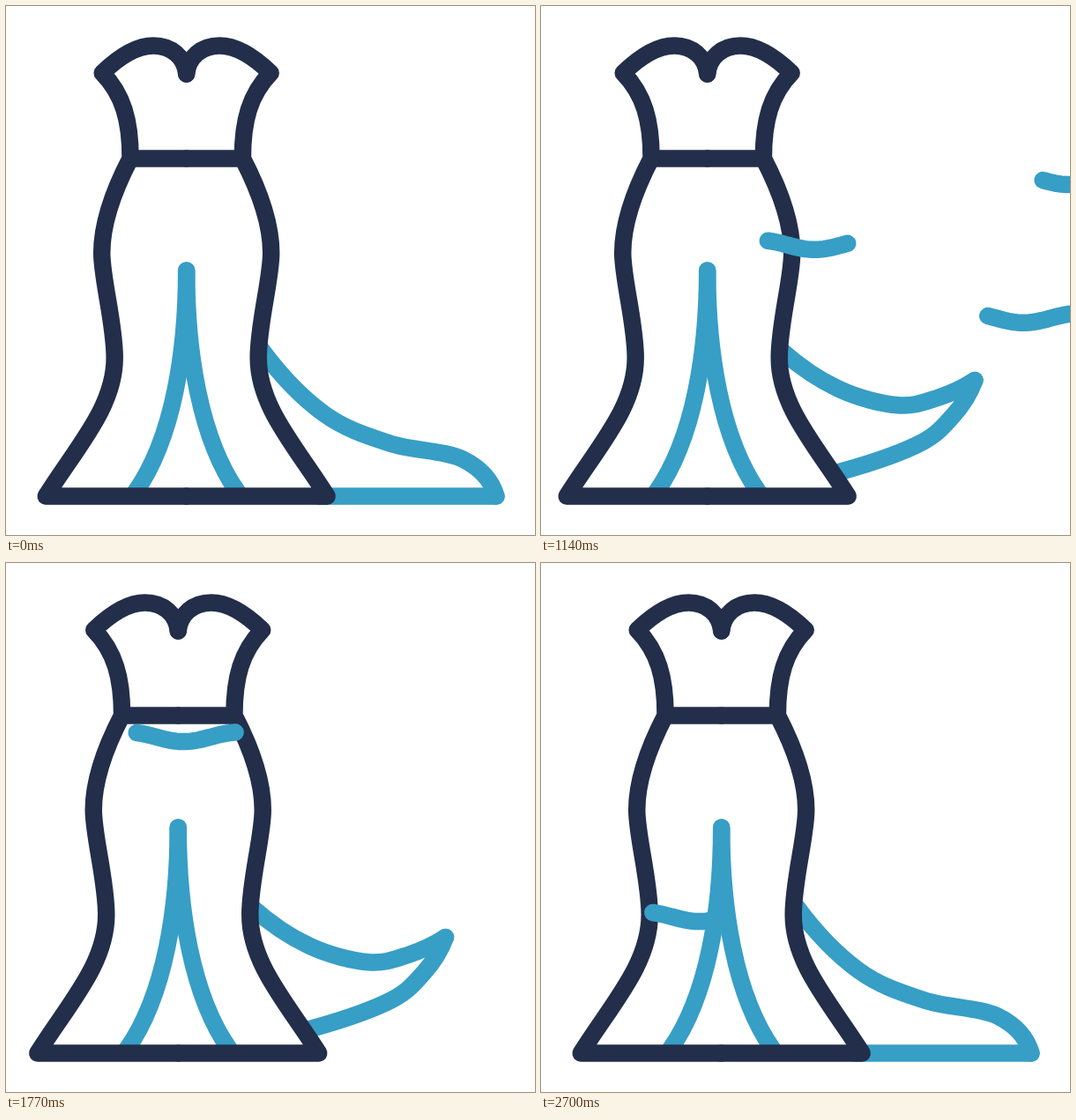
Recreate the animation shown at these times as an HTML page with a canvas. Size 600 by 600 pixels, loop 2730 ms.

```html
<!DOCTYPE html>
<html lang="en">
<head>
<meta charset="utf-8">
<title>Dress in the wind</title>
<style>
  html, body { margin: 0; width: 100%; height: 100%; overflow: hidden; background: #fff; }
  canvas { display: block; width: 100vmin; height: 100vmin; }
</style>
</head>
<body>
<canvas id="stage" width="600" height="600"></canvas>
<script>
const ctx = document.getElementById('stage').getContext('2d');
const NAVY = '#222e4a', BLUE = '#379ec6';
const LOOP = 2730, STEP = 30, MID = 204.7;

const smooth = k => k * k * (3 - 2 * k);
const linear = k => k;
const easeIn = k => k * (0.55 + 0.45 * k);
const easeOut = k => k * (2 - k);
const mix = (a, b, k) => a + (b - a) * k;
const blend = (a, b, k) => a.map(([x, y], i) => [mix(x, b[i][0], k), mix(y, b[i][1], k)]);

// keys: [time, value, easing towards the next key]
function at(keys, t, mixer = mix) {
  const n = keys.findIndex(key => t < key[0]);
  if (n === 0) return keys[0][1];
  if (n < 0) return keys[keys.length - 1][1];
  const [t0, a, ease = smooth] = keys[n - 1], [t1, b] = keys[n];
  return mixer(a, b, ease((t - t0) / (t1 - t0)));
}

// One half of the dress, measured from its centre line
const half = new Path2D(`M0 77C2 58 17 45 37.5 45S79 60 95.5 76
  C72 100 63.5 130 63.7 173C84 212 96 250 96 280S81.5 360 81.5 399
  C81.5 455 124.5 500 159.5 556H0M0 173H63.7`);
const pleat = new Path2D('M0 300C0 390 14.5 490 58.5 552');

// The train: five points along the top to the tip, three back along the hem
const REST = [[290, 390], [360, 462], [435, 496], [518, 514], [556, 556],
  [490, 556], [420, 556], [355, 556]];
const WHIP = [[289, 390], [331, 422], [369, 434], [460, 409], [515, 413],
  [448, 455], [404, 503], [344, 536]];
const HIGH = [[289, 391], [353, 433], [420, 451], [465, 441], [506, 419],
  [483, 461], [442, 496], [341, 531]];
const LOW = blend(HIGH, REST, 0.04);
const TIP = 4;

const train = [[585, REST, easeIn], [870, WHIP, easeOut], [1140, LOW], [1380, HIGH],
  [1790, LOW], [2200, HIGH], [2650, REST]];
const sway = [[585, 0], [1080, -16], [1380, -16], [1790, -9.4], [2200, -16], [2650, 0]];

// Each gust is a wave drifting left while its visible part runs along it
const DRIFT = 0.238, WAVE = 124, HEIGHT = 5.3;
const gusts = [
  { start: 700, x: 362, y: 271 },
  { start: 910, x: 549, y: 354 },
  { start: 1380, x: 241, y: 197.3 },
  { start: 2220, x: 241, y: 401.3 }
];
const headAt = t => Math.max(0, 139 - 0.55 * t);
const tail = [[-300, 398, linear], [0, 295, linear], [170, 235, linear], [390, 112, linear], [650, 0]];

function stroke(path, color) {
  ctx.strokeStyle = color;
  ctx.stroke(path);
}

// Smooth curve through points, its ends bent like a parabola
function spline(points) {
  const n = points.length - 1;
  const beyond = (a, b, c) => a.map((v, i) => 3 * v - 3 * b[i] + c[i]);
  const p = [beyond(...points), ...points, beyond(points[n], points[n - 1], points[n - 2])];
  const path = new Path2D();
  path.moveTo(...points[0]);
  for (let i = 1; i <= n; i++) {
    const [a, b, c, d] = p.slice(i - 1, i + 3);
    const out = b.map((v, j) => v + (c[j] - a[j]) / 6);
    const into = c.map((v, j) => v - (d[j] - b[j]) / 6);
    path.bezierCurveTo(...out, ...into, ...c);
  }
  return path;
}

function mirrored(paint) {
  for (const side of [-1, 1]) {
    ctx.save();
    ctx.translate(MID, 0);
    ctx.scale(side, 1);
    paint();
    ctx.restore();
  }
}

function drawDress(t) {
  ctx.save();
  ctx.translate(at(sway, t), 0);
  const pose = at(train, t, blend);
  stroke(spline(pose.slice(0, TIP + 1)), BLUE);
  stroke(spline(pose.slice(TIP)), BLUE);
  mirrored(() => ctx.fill(half));
  mirrored(() => stroke(pleat, BLUE));
  mirrored(() => stroke(half, NAVY));
  ctx.restore();
}

function drawGust({ start, x, y }, t) {
  const age = t - start;
  if (age < -300 || age >= 650) return;
  const from = headAt(age), to = at(tail, age);
  const path = new Path2D();
  for (let i = 0; i <= 40; i++) {
    const s = mix(from, to, i / 40);
    path.lineTo(x - DRIFT * age + s, y + HEIGHT * Math.cos((s - 53) / WAVE * 2 * Math.PI));
  }
  stroke(path, BLUE);
}

function draw(t) {
  ctx.fillStyle = '#fff';
  ctx.fillRect(0, 0, 600, 600);
  ctx.lineWidth = 19.5;
  ctx.lineCap = ctx.lineJoin = 'round';
  drawDress(t);
  for (const gust of gusts) drawGust(gust, t);
}

function tick() {
  const t = performance.now() % LOOP;
  draw(Math.floor(t / STEP) * STEP);
  requestAnimationFrame(tick);
}
tick();
</script>
</body>
</html>
```
